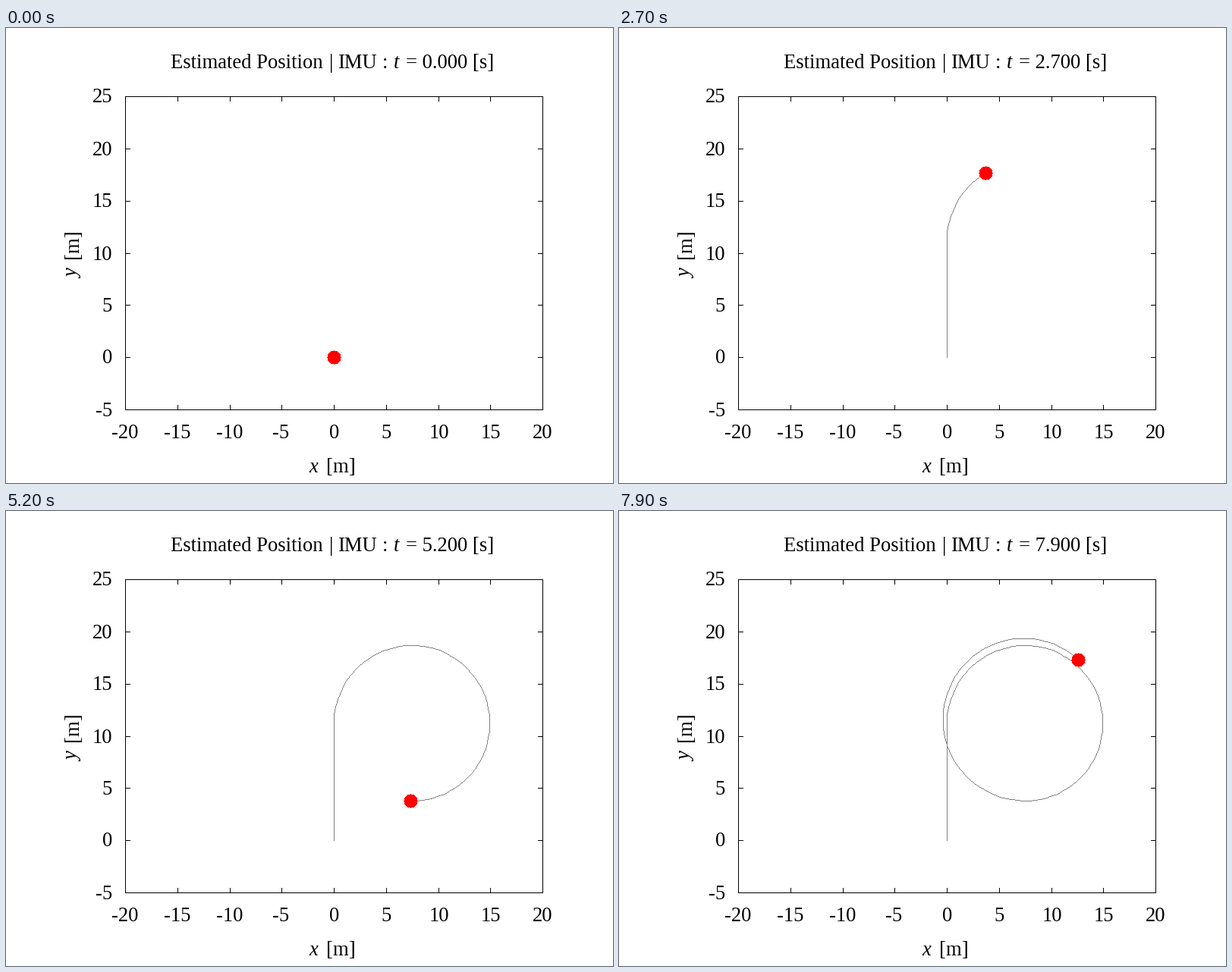
These frames come from a looping animation (800x600 px, 8000 ms). A matplotlib script:

```python
import numpy as np
import matplotlib.pyplot as plt
from matplotlib.animation import FuncAnimation

plt.rcParams["font.family"] = "Liberation Serif"
plt.rcParams["font.size"] = 19.2

FRAMES, STEP = 80, 0.1
W, H = 800, 600
LEFT, RIGHT, TOP, BOTTOM = 157, 707, 90, 503
ACCEL, TURN = 5.69, 1.986                   # straight run, then the turn
GRAY, RED, DOT_R = (128, 128, 128), (255, 0, 0), 9

fig = plt.figure(figsize=(W / 100, H / 100), dpi=100, facecolor="white")
ax = fig.add_axes([0, 0, 1, 1])
ax.axis("off")
rows, cols = np.mgrid[:H, :W]
layer = ax.imshow(np.full((H, W, 3), 255, np.uint8), extent=(0, W, H, 0),
                  aspect="auto", interpolation="nearest", zorder=0)
ax.set_xlim(0, W)
ax.set_ylim(H, 0)


def to_px(x, y):
    """Metres to whole pixel columns and rows."""
    px = LEFT + (x + 20) * (RIGHT - LEFT) / 40
    py = BOTTOM - (y + 5) * (BOTTOM - TOP) / 30
    return np.floor(px + 0.5).astype(int), np.floor(py + 0.5).astype(int)


def position(t):
    """Accelerate straight ahead, then circle with a slowly drifting estimate."""
    t = np.asarray(t, float)
    u = np.clip((t - 4.5) / 1.35, 0, 1)
    s = u * u * (3 - 2 * u)
    theta = 1.469 * (t - TURN) - 0.0096 * np.maximum(t - 4.8, 0) ** 2
    radius = 7.46 + 0.30 * s
    x = 7.46 - 0.10 * s - radius * np.cos(theta)
    y = 11.23 + 0.38 * s + radius * np.sin(theta)
    straight = t < TURN
    return np.where(straight, 0, x), np.where(straight, ACCEL * t * t / 2, y)


def draw_polyline(img, xs, ys, color):
    """Hard-edged line, one pixel wide."""
    for x0, y0, x1, y1 in zip(xs, ys, xs[1:], ys[1:]):
        n = max(abs(x1 - x0), abs(y1 - y0)) + 1
        px = np.rint(np.linspace(x0, x1, n)).astype(int)
        py = np.rint(np.linspace(y0, y1, n)).astype(int)
        img[py, px] = color


def rule(xs, ys):
    ax.plot(np.add(xs, 0.5), np.add(ys, 0.5), color="black", lw=0.72,
            snap=False, solid_capstyle="projecting", solid_joinstyle="miter")


def label(x, y, text, **kw):
    return ax.text(x, y, text, va="baseline", **kw)


def draw_axes():
    rule([LEFT, RIGHT, RIGHT, LEFT, LEFT], [TOP, TOP, BOTTOM, BOTTOM, TOP])
    for v in range(-20, 21, 5):
        x, _ = to_px(v, 0)
        rule([x, x], [TOP, TOP + 6])
        rule([x, x], [BOTTOM, BOTTOM - 6])
        label(x + 0.5 - (v < 0), 541, str(v), ha="center")
    for v in range(-5, 26, 5):
        _, y = to_px(0, v)
        rule([LEFT, LEFT + 6], [y, y])
        rule([RIGHT, RIGHT - 6], [y, y])
        label(140, y + 8.5, str(v), ha="right")


def draw_labels():
    for x, word in ((217, "Estimated Position"), (426, "|"),
                    (438, "IMU"), (496, ":")):
        label(x, 53, word)
    label(511, 53, "t", style="italic")
    label(399, 586, "x", style="italic")
    label(421.5, 586, "[m]")
    up = dict(rotation=90, rotation_mode="anchor")
    label(95, 330, "y", style="italic", **up)
    label(95, 304, "[m]", **up)


draw_axes()
draw_labels()
clock = label(527, 53, "")


def update(i):
    t = i * STEP
    clock.set_text(f"= {t:.3f} [s]")
    img = np.full((H, W, 3), 255, np.uint8)
    xs, ys = to_px(*position(np.linspace(0, t, 2 * i + 1)))
    draw_polyline(img, xs, ys, GRAY)
    img[(cols - xs[-1]) ** 2 + (rows - ys[-1]) ** 2 <= DOT_R ** 2] = RED
    layer.set_data(img)
    return clock, layer


anim = FuncAnimation(fig, update, frames=FRAMES, interval=1000 * STEP,
                     repeat=True, repeat_delay=0)
plt.show()
```
